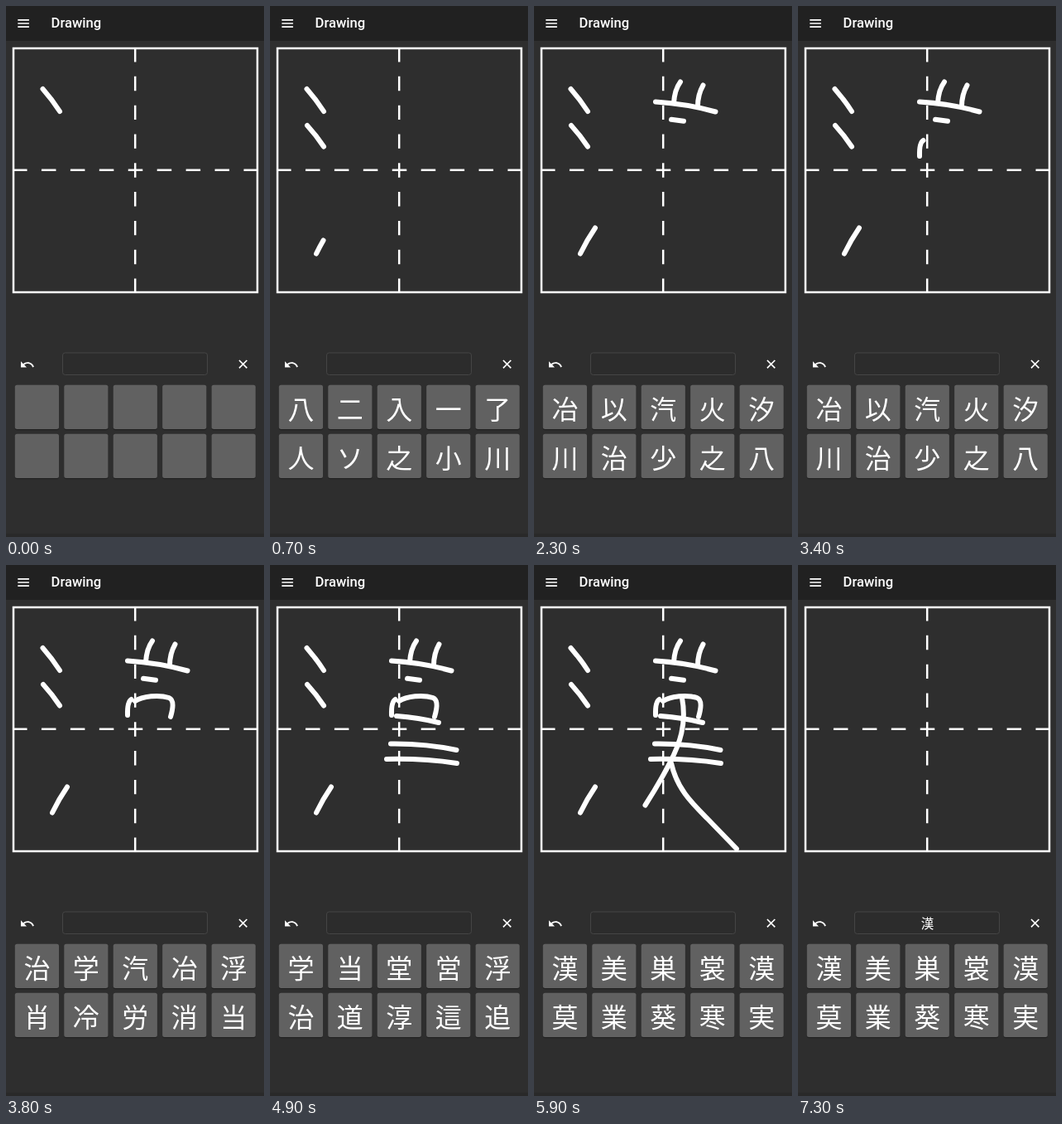
Recreate the animation shown at these times as an HTML page. Size 312x640 px, loop 8 s.

```html
<!DOCTYPE html>
<html lang="ja">
<head>
<meta charset="utf-8">
<title>Drawing</title>
<style>
html, body { margin: 0; width: 100%; height: 100%; overflow: hidden; background: #2e2e2e; }
svg { display: block; width: 312px; height: 640px; }
.title { font: 500 16.6px Roboto, sans-serif; fill: #fff; }
.kanji { font-family: "Noto Sans CJK JP", "Noto Sans CJK", sans-serif; fill: #fff; text-anchor: middle; }
.grid { fill: none; stroke: #fff; stroke-width: 2.5; }
.ink { fill: none; stroke: #fff; stroke-width: 6; stroke-linecap: round; stroke-linejoin: round; }
.icon { fill: none; stroke: #fff; stroke-width: 1.7; }
</style>
</head>
<body>
<svg viewBox="0 0 312 640">
  <rect width="312" height="640" fill="#2e2e2e"/>
  <rect y="636" width="312" height="4" fill="#292929"/>
  <rect width="312" height="42" fill="#212121"/>
  <path class="icon" d="M14.3 16.8h13.6M14.3 21h13.6M14.3 25.2h13.6"/>
  <text class="title" x="54.6" y="26.3">Drawing</text>

  <rect class="grid" x="9" y="51" width="295" height="294"/>
  <path class="grid" d="M8 197.8H305" stroke-dasharray="17.5 17.44"/>
  <path class="grid" d="M156.2 50V346" stroke-dasharray="17.4 17.42"/>
  <g id="ink" class="ink"></g>

  <path fill="#fff" transform="translate(16.4 422.9) scale(.78)" d="M12.5 8c-2.65 0-5.05.99-6.9 2.6L2 7v9h9l-3.62-3.62c1.39-1.16 3.16-1.88 5.12-1.88 3.54 0 6.55 2.31 7.6 5.5l2.37-.78C21.08 11.03 17.15 8 12.5 8z"/>
  <rect x="68.5" y="418" width="175" height="26.5" rx="3" fill="#2c2c2c" stroke="#454545"/>
  <text id="field" class="kanji" x="156.5" y="437.8" font-size="15.5"></text>
  <path class="icon" d="M282 427l9.4 9.4M291.4 427l-9.4 9.4"/>
  <g id="keys"></g>
</svg>
<script>
const LOOP = 8000, TICK = 100, COMMIT = 6900;

// start time, ticks to draw, path
const strokes = [
  [0, 1, "M44.5 100Q56 113 65 127"],
  [200, 2, "M45 144Q56 156 65 169.5"],
  [700, 2, "M56 298.5Q64 282 74 267.5"],
  [1200, 3, "M147 115.5Q186 118 219.5 127.5"],
  [1700, 2, "M177 91.5Q170 101 169 117"],
  [1900, 2, "M204.5 95.5Q198 107 198 121"],
  [2200, 1, "M166 136.8L181 138.8"],
  [3300, 2, "M151.5 162Q146.5 165 147 181"],
  [3500, 4, "M156 164C165 158 185 156 197 160Q205 163 199 183"],
  [3900, 2, "M153 182Q180 184 204 190"],
  [4200, 3, "M146 215.5Q188 215 225.5 223"],
  [4600, 4, "M141 234Q186 233 226 239"],
  [5100, 4, "M179 160C185 192 176 216 164 239Q151 264 134.5 289.5"],
  [5500, 4, "M166 239C173 270 191 287 210 306L245 342"]
];

const candidates = [
  [0, ""],
  [400, "八二入一了人ソ之小川"],
  [800, "入八二一了之川少小汀"],
  [1500, "入八二一了之少戸汀川"],
  [1900, "以火汐八川之少汀冶心"],
  [2300, "冶以汽火汐川治少之八"],
  [3500, "治学汽冶浮肖冷労消当"],
  [4500, "学当堂営浮治道淳這追"],
  [5000, "営学堂当業治道淳漢浮"],
  [5900, "漢美巣裳漠莫業葵寒実"]
];

const byId = id => document.getElementById(id);

function add(parent, tag, attrs) {
  const el = document.createElementNS("http://www.w3.org/2000/svg", tag);
  for (const name in attrs) el.setAttribute(name, attrs[name]);
  return parent.appendChild(el);
}

const lines = strokes.map(([, , d]) => add(byId("ink"), "path", { d, pathLength: 1 }));

const labels = Array.from({ length: 10 }, (_, i) => {
  const x = 10.8 + (i % 5) * 59.45, y = 456.8 + Math.floor(i / 5) * 59;
  const box = { x, width: 53.2, height: 53.2, rx: 2.5 };
  add(byId("keys"), "rect", { ...box, y: y + 1.2, fill: "#222" });
  add(byId("keys"), "rect", { ...box, y, fill: "#616161" });
  return add(byId("keys"), "text", { class: "kanji", x: x + 26.6, y: y + 41.2, "font-size": 32 });
});

function draw(time) {
  const t = Math.floor((time % LOOP) / TICK) * TICK;
  strokes.forEach(([start, ticks], i) => {
    const p = Math.min(1, ((t - start) / TICK + 1) / ticks);
    const shown = p > 0 && t < COMMIT;
    lines[i].style.display = shown ? "" : "none";
    if (shown) lines[i].setAttribute("stroke-dasharray", p < 1 ? `${p} 2` : "none");
  });
  const chars = candidates.filter(([start]) => start <= t).pop()[1];
  labels.forEach((label, i) => { label.textContent = chars[i] || ""; });
  byId("field").textContent = t < COMMIT ? "" : "漢";
}

const begin = performance.now();
function loop() {
  draw(performance.now() - begin);
  requestAnimationFrame(loop);
}
loop();
</script>
</body>
</html>
```
